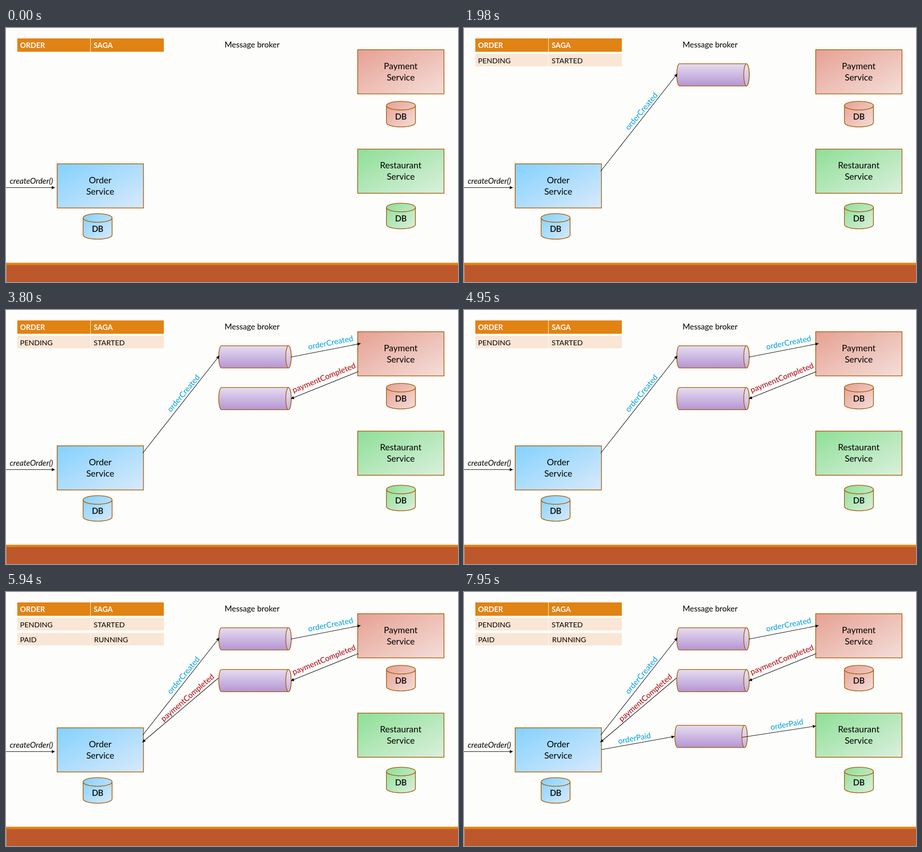
Write an HTML page that moves like this. It is 998 px wide and 561 px high and loops after 8 s.

```html
<!DOCTYPE html>
<html lang="en">
<head>
<meta charset="utf-8">
<title>Order saga</title>
<style>
  html, body { margin: 0; width: 100%; height: 100%; overflow: hidden; background: #fdfdfc; }
  svg { display: block; width: 998px; height: 561px; font-family: Lato, Carlito, sans-serif; }
  .edge { stroke: #a75f0a; stroke-width: 1.6; }
  .arrow { stroke: #000; stroke-width: 1.1; marker-end: url(#head); }
</style>
</head>
<body>
<svg id="stage" viewBox="0 0 998 561"></svg>
<script>
const LOOP = 8000;
const BLUE = '#00a0dc', RED = '#ae0008';

const text = (x, y, s, size, attrs = '') =>
  `<text x="${x}" y="${y}" font-size="${size}" ${attrs}>${s}</text>`;
const mid = 'text-anchor="middle"';
const rect = (x, y, w, h, fill, attrs = '') =>
  `<rect x="${x}" y="${y}" width="${w}" height="${h}" fill="${fill}" ${attrs}/>`;

const gradient = (id, from, to, x2 = 1) =>
  `<linearGradient id="${id}" x2="${x2}" y2="1">
    <stop stop-color="${from}"/><stop offset="1" stop-color="${to}"/></linearGradient>`;

const arrow = (x1, y1, x2, y2) =>
  `<line class="arrow" x1="${x1}" y1="${y1}" x2="${x2}" y2="${y2}"/>`;

// Tilted caption, centred on the middle of its lowercase letters
const label = (x, y, angle, s, color) =>
  `<g transform="translate(${x} ${y}) rotate(${-angle})">${text(0, 4.4, s, 17.3, `${mid} fill="${color}"`)}</g>`;

const service = (x, y, name, fill) =>
  rect(x, y, 190.5, 97.5, `url(#${fill})`, 'class="edge"') +
  text(x + 95, y + 42.5, name, 19.4, mid) +
  text(x + 95, y + 67.5, 'Service', 19.4, mid);

const database = (x, y, fill) =>
  `<g class="edge" transform="translate(${x} ${y})" fill="url(#${fill})">
    <path d="M0 9.5A32 9.5 0 0 1 64 9.5V47A32 9.5 0 0 1 0 47Z"/>
    <path d="M0 9.5A32 9.5 0 0 0 64 9.5" fill="none"/></g>` +
  text(x + 32, y + 39.5, 'DB', 18, `${mid} stroke="#000" stroke-width=".3"`);

const queue = (x, y) =>
  `<g class="edge" transform="translate(${x} ${y})" fill="url(#purple)">
    <path d="M6 0H154A6 24.5 0 0 1 154 49H6A6 24.5 0 0 1 6 0Z"/>
    <ellipse cx="154" cy="24.5" rx="6" ry="24.5" fill="url(#cap)"/></g>`;

const row = (y, h, fill, a, b, attrs, bx = 193.5) =>
  rect(25, y, 161, h, fill) + rect(187, y, 161.5, h, fill) +
  text(31, y + 20.5, a, 16.1, attrs) + text(bx, y + 20.5, b, 16.1, attrs);

const base =
  `<defs>
    <marker id="head" markerUnits="userSpaceOnUse" markerWidth="8" markerHeight="8" refX="7" refY="3.5" orient="auto">
      <path d="M0 0L7 3.5L0 7Z"/></marker>` +
  gradient('blue', '#84d1fe', '#d8eafb') +
  gradient('pink', '#e6a193', '#f4ded9') +
  gradient('green', '#8edf97', '#dbf0dd') +
  gradient('purple', '#e6ddf0', '#b495d3', 0) +
  gradient('cap', '#ebe4f3', '#c8b2df', 0) +
  '</defs>' +
  rect(0, 0, 998, 561, '#fdfdfc') +
  rect(0, 518.5, 998, 5.5, '#e48312') +
  rect(0, 523.5, 998, 37.5, '#bd582c') +
  rect(0, 523.5, 0.8, 37.5, '#d9c0b4') +
  row(23, 29.5, '#e18313', 'ORDER', 'SAGA', 'fill="#fff" font-weight="bold"') +
  text(543.5, 43, 'Message broker', 17.5, mid) +
  service(776.5, 48, 'Payment', 'pink') + database(840, 162, 'pink') +
  service(776.5, 267.5, 'Restaurant', 'green') + database(840, 387, 'green') +
  service(113, 300, 'Order', 'blue') + database(170.3, 410, 'blue') +
  text(56, 344, 'createOrder()', 17.4, `${mid} font-style="italic"`) +
  arrow(0, 352.5, 108, 352.5);

// Each step: time it appears, and what it adds
const steps = [
  [1250, row(57, 27.5, '#fae6d5', 'PENDING', 'STARTED') + queue(469.7, 79) +
    arrow(302, 316, 471, 101) + label(393, 185, 50, 'orderCreated', BLUE)],
  [2510, arrow(629, 104, 783, 74) + label(717, 73.5, 11, 'orderCreated', BLUE)],
  [3760, queue(469.7, 171.3) + arrow(778, 136, 629, 196) +
    label(702.5, 151, 22, 'paymentCompleted', RED)],
  [5015, row(90.5, 27.5, '#fae6d5', 'PAID', 'RUNNING', '', 194.5) +
    arrow(469, 190, 301, 332) + label(401.5, 234.5, 41, 'paymentCompleted', RED)],
  [6270, queue(465.5, 294.5) + arrow(304, 348, 465, 319) +
    label(376.5, 324.5, 10.5, 'orderPaid', BLUE)],
  [7525, arrow(614, 321, 777, 296) + label(713, 294, 10, 'orderPaid', BLUE)]
];

const stage = document.getElementById('stage');
stage.innerHTML = base + steps.map(([, art]) => `<g class="step" visibility="hidden">${art}</g>`).join('');
const groups = stage.querySelectorAll('.step');

const start = performance.now();
function draw(now) {
  const t = Math.max(0, now - start) % LOOP;
  groups.forEach((g, i) => g.setAttribute('visibility', t >= steps[i][0] ? 'visible' : 'hidden'));
  requestAnimationFrame(draw);
}
requestAnimationFrame(draw);
</script>
</body>
</html>
```
